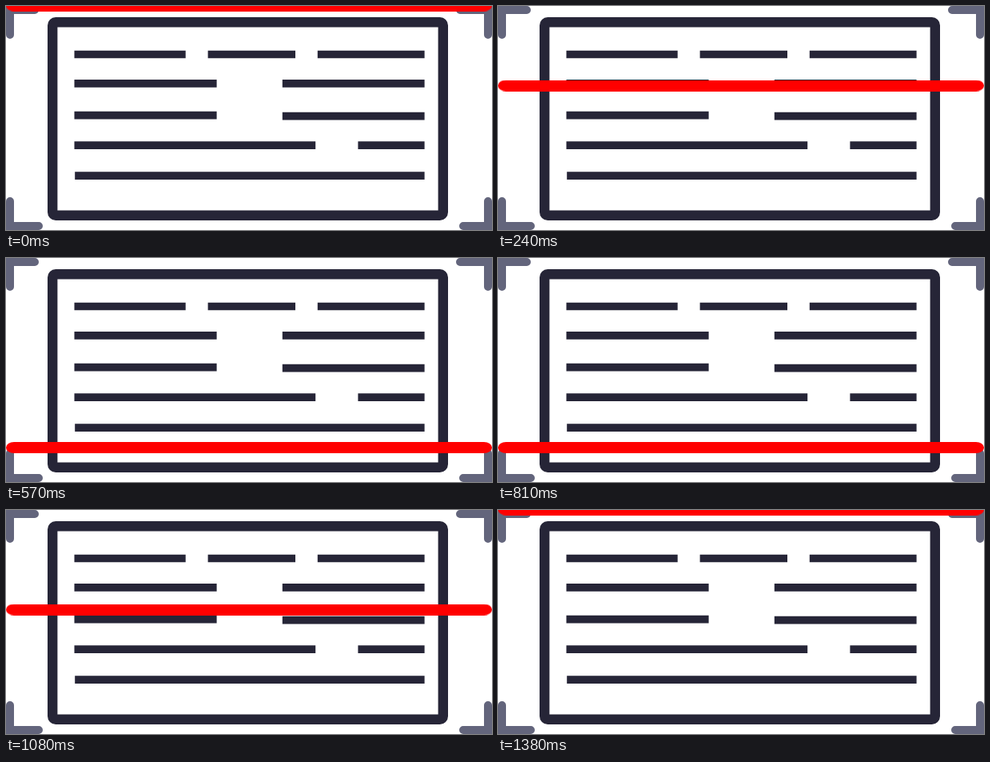
An HTML page that plays this animation: 608x280 px, repeating every 1410 ms.

```html
<!DOCTYPE html>
<html lang="en">
<head>
<meta charset="utf-8">
<title>Document scan</title>
<style>
  html, body { margin: 0; width: 100%; height: 100%; overflow: hidden; background: #fff; }
  svg { display: block; width: 608px; height: 280px; }
  .sheet { fill: none; stroke: #262537; stroke-width: 12.4; }
  .text { stroke: #262537; stroke-width: 9.7; }
  .corners { fill: none; stroke: #63657c; stroke-width: 10; stroke-linecap: round; }
</style>
</head>
<body>
<svg viewBox="0 0 608 280">
  <path class="corners" d="M5 36V5H36M568 5H603V36M5 244V275H41M572 275H603V244"/>
  <rect class="sheet" x="58.2" y="20.2" width="488.6" height="241.6" rx="4"/>
  <path class="text" d="
    M85.5 60.5H224.7M252.6 60.5H362M389.8 60.5H523.6
    M85.5 96.8H263.6M345.8 96.8H523.6
    M85.5 136.7H263.6M345.8 137.6H523.6
    M85.5 174.2H387.2M440.4 174.2H523.6
    M86.2 212.2H523.6"/>
  <rect id="beam" y="-7" width="608" height="14" rx="10" ry="7" fill="#f00"/>
</svg>
<script>
  const TICK = 30, TURN = 23, LOOP = 47 * TICK;
  const startY = -0.5, endY = startY + 12.5 * TURN;
  const ticks = `steps(${TURN}, end)`;
  const at = (y, tick, easing) => ({
    transform: `translateY(${y}px)`, offset: tick * TICK / LOOP, easing
  });

  // Down past the lower edge, back up, then one tick of rest.
  document.getElementById('beam').animate([
    at(startY, 0, ticks),
    at(endY, TURN, ticks),
    at(startY, 2 * TURN, 'linear'),
    at(startY, 2 * TURN + 1, 'linear')
  ], { duration: LOOP, iterations: Infinity });
</script>
</body>
</html>
```
